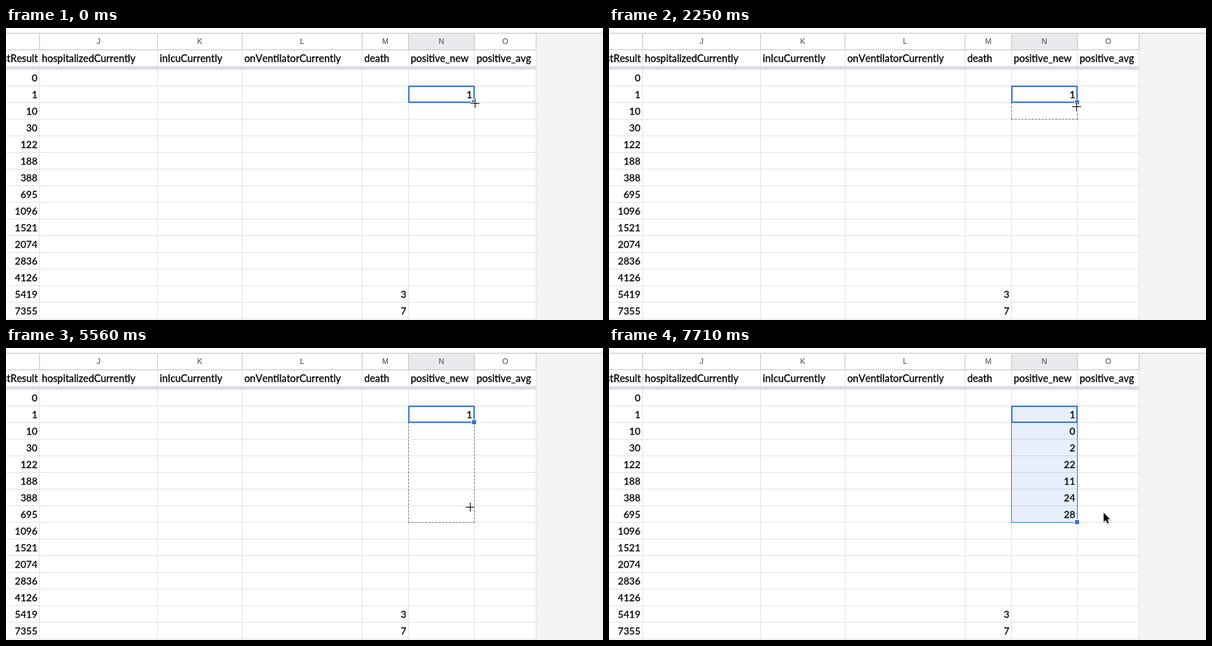
Animation of 861 by 421 pixels, one loop 8 s. Source, as an HTML page with a canvas:

```html
<!DOCTYPE html>
<html lang="en">
<head>
<meta charset="utf-8">
<title>Spreadsheet fill handle</title>
<style>
  html, body { margin: 0; width: 100%; height: 100%; overflow: hidden; background: #fff; }
  canvas { display: block; }
</style>
</head>
<body>
<canvas id="stage" width="861" height="421"></canvas>
<script>
const ctx = document.getElementById('stage').getContext('2d');
const W = 861, H = 421, LOOP = 8000, STEP = 57;
const ROW_H = 24, FIRST_ROW = 59;
const BLUE = '#3873e4', GRID = '#e2e3e3', HEAD_LINE = '#c3c4c5';
const FAMILY = 'Lato, "Open Sans", sans-serif';
const TITLE_FONT = '14.4px ' + FAMILY, NUMBER_FONT = '14px ' + FAMILY;
const HEAD_FONT = '11px "Liberation Sans", Arial, sans-serif';

const columns = [
  { letter: 'J', left: 48, title: 'hospitalizedCurrently' },
  { letter: 'K', left: 218, title: 'inIcuCurrently' },
  { letter: 'L', left: 340, title: 'onVentilatorCurrently' },
  { letter: 'M', left: 513, title: 'death' },
  { letter: 'N', left: 580, title: 'positive_new' },
  { letter: 'O', left: 675, title: 'positive_avg' }
];
const RIGHT = 764;
const results = '0 1 10 30 122 188 388 695 1096 1521 2074 2836 4126 5419 7355'.split(' ');
const filled = '0 2 22 11 24 28'.split(' ');
const N_LEFT = 580, N_RIGHT = 675, CELL_TOP = 83, CELL_BOTTOM = 107;

const ARROW_ON = 60, CROSS_ON = 1550, ARROW_AGAIN = 6690, DROP = 6810;

// Each pull drags the handle about one row down, a little quicker every time
const pullStarts = [2140, 3080, 3610, 4210, 5030, 5560];
const pulls = pullStarts.map((start, i) => ({
  start, end: start + 340 - 35 * i,
  x: Math.max(669, 673 - 2 * i), y: 125 + 23 * i + i * i / 2
}));
const moves = [
  { start: 60, end: 230, x: 702, y: 234 },
  { start: 580, end: 800, x: 684, y: 137 },
  { start: 840, end: 1380, x: 674, y: 115 },
  { start: 1440, end: 1660, x: 674, y: 105 },
  ...pulls,
  { start: 6270, end: 6330, x: 668, y: 248 },
  { start: 6690, end: 6690, x: 666, y: 248 },
  { start: 7530, end: 7710, x: 713, y: 237 }
];

const smooth = p => p * p * (3 - 2 * p);

function pointerAt(t) {
  let x = 676, y = 108;
  for (const m of moves) {
    if (t < m.start) break;
    const steps = Math.round((m.end - m.start) / STEP) + 1;
    const step = Math.floor((t - m.start) / STEP + 0.2) + 1;
    const p = smooth(Math.min(step / steps, 1));
    x += (m.x - x) * p;
    y += (m.y - y) * p;
  }
  return [Math.round(x), Math.round(y)];
}

function rect(x, y, w, h, color) {
  ctx.fillStyle = color;
  ctx.fillRect(x, y, w, h);
}

function outline(x, y, w, h, width) {
  ctx.strokeStyle = BLUE;
  ctx.lineWidth = width;
  ctx.strokeRect(x, y, w, h);
}

// A thin stroke thickens the glyphs
function text(s, x, y, align, font, color, weight) {
  ctx.font = font;
  ctx.fontKerning = 'none';
  ctx.textAlign = align;
  ctx.fillStyle = ctx.strokeStyle = color;
  ctx.lineWidth = weight;
  ctx.fillText(s, x, y);
  ctx.strokeText(s, x, y);
}

const title = (s, x) => text(s, x, 49, 'left', TITLE_FONT, '#000', 0.3);
const number = (s, edge, row) =>
  text(s, edge - 2.7, FIRST_ROW + row * ROW_H + 18, 'right', NUMBER_FONT, '#000', 0.3);

function drawSheet() {
  rect(0, 0, W, H, '#fff');
  rect(RIGHT + 1, 8, W - RIGHT - 1, H - 8, '#f3f3f3');
  rect(N_LEFT + 1, 8, N_RIGHT - N_LEFT - 1, 23, '#e8eaed');
  for (const x of [...columns.map(c => c.left), RIGHT]) {
    rect(x, 31, 1, H - 31, GRID);
    rect(x, 8, 1, 23, HEAD_LINE);
  }
  for (let y = CELL_TOP; y < H; y += ROW_H) rect(0, y, RIGHT + 1, 1, GRID);
  rect(0, 7, W, 1, HEAD_LINE);
  rect(0, 31, RIGHT + 1, 1, HEAD_LINE);
  rect(0, 55, RIGHT + 1, 5, '#dadde8');

  columns.forEach((c, i) => {
    const end = i + 1 < columns.length ? columns[i + 1].left : RIGHT;
    text(c.letter, (c.left + end + 1) / 2, 23, 'center', HEAD_FONT, '#505356', 0.1);
    title(c.title, c.left + 3.7);
  });
  title('stResult', -5);
  results.forEach((s, row) => number(s, 48, row));
  number('3', 580, 13);
  number('7', 580, 14);
}

function drawHandle(bottom) {
  rect(N_RIGHT - 4, bottom - 4, 8, 8, '#fff');
  rect(N_RIGHT - 3, bottom - 3, 6, 6, BLUE);
}

// Dashes of 3 with gaps near 2, fitted so that both ends carry a dash
function dashedLine(x0, y0, x1, y1) {
  const length = Math.hypot(x1 - x0, y1 - y0);
  const count = Math.round((length + 2) / 5);
  ctx.setLineDash([3, (length - 3 * count) / (count - 1)]);
  ctx.beginPath();
  ctx.moveTo(x0, y0);
  ctx.lineTo(x1, y1);
  ctx.stroke();
  ctx.setLineDash([]);
}

function drawDashes(bottom) {
  ctx.strokeStyle = '#777';
  ctx.lineWidth = 1;
  for (const x of [N_LEFT, N_RIGHT]) dashedLine(x + 0.5, CELL_BOTTOM, x + 0.5, bottom + 1);
  dashedLine(N_LEFT, bottom + 0.5, N_RIGHT + 1, bottom + 0.5);
}

function drawSelection(t, y) {
  const done = t >= DROP;
  const lastBottom = CELL_BOTTOM + filled.length * ROW_H;
  const width = N_RIGHT - N_LEFT;
  if (done) {
    rect(N_LEFT, CELL_TOP, width + 1, lastBottom - CELL_TOP + 1, 'rgba(58,118,228,0.115)');
    outline(N_LEFT + 0.5, CELL_TOP + 0.5, width, lastBottom - CELL_TOP, 1);
    filled.forEach((s, i) => number(s, N_RIGHT, i + 2));
  } else if (t >= pullStarts[0] && y > CELL_BOTTOM) {
    drawDashes(CELL_BOTTOM + Math.ceil((y - CELL_BOTTOM) / ROW_H) * ROW_H);
  }
  outline(N_LEFT + 1, CELL_TOP + 1, width - 1, CELL_BOTTOM - CELL_TOP - 1, 2);
  number('1', N_RIGHT, 1);
  drawHandle(done ? lastBottom : CELL_BOTTOM);
}

function drawCross(x, y) {
  rect(x - 6, y - 1, 13, 3, '#fff');
  rect(x - 1, y - 6, 3, 13, '#fff');
  rect(x - 6, y, 13, 1, '#000');
  rect(x, y - 6, 1, 13, '#000');
}

function drawArrow(x, y) {
  const shape = new Path2D('M0 0V13L3 10.5L5.2 15.2L7.3 14.3L5.2 9.6H9Z');
  ctx.save();
  ctx.translate(x + 0.5, y + 0.5);
  ctx.shadowColor = 'rgba(0,0,0,0.35)';
  ctx.shadowBlur = 2;
  ctx.shadowOffsetY = 1;
  ctx.strokeStyle = '#fff';
  ctx.lineWidth = 1.6;
  ctx.stroke(shape);
  ctx.shadowColor = 'transparent';
  ctx.fillStyle = '#000';
  ctx.fill(shape);
  ctx.restore();
}

function draw(t) {
  const [x, y] = pointerAt(t);
  const arrow = (t >= ARROW_ON && t < CROSS_ON) || t >= ARROW_AGAIN;
  drawSheet();
  drawSelection(t, y);
  (arrow ? drawArrow : drawCross)(x, y);
}

const began = performance.now();
function tick() {
  draw((performance.now() - began) % LOOP);
  requestAnimationFrame(tick);
}
tick();
</script>
</body>
</html>
```
